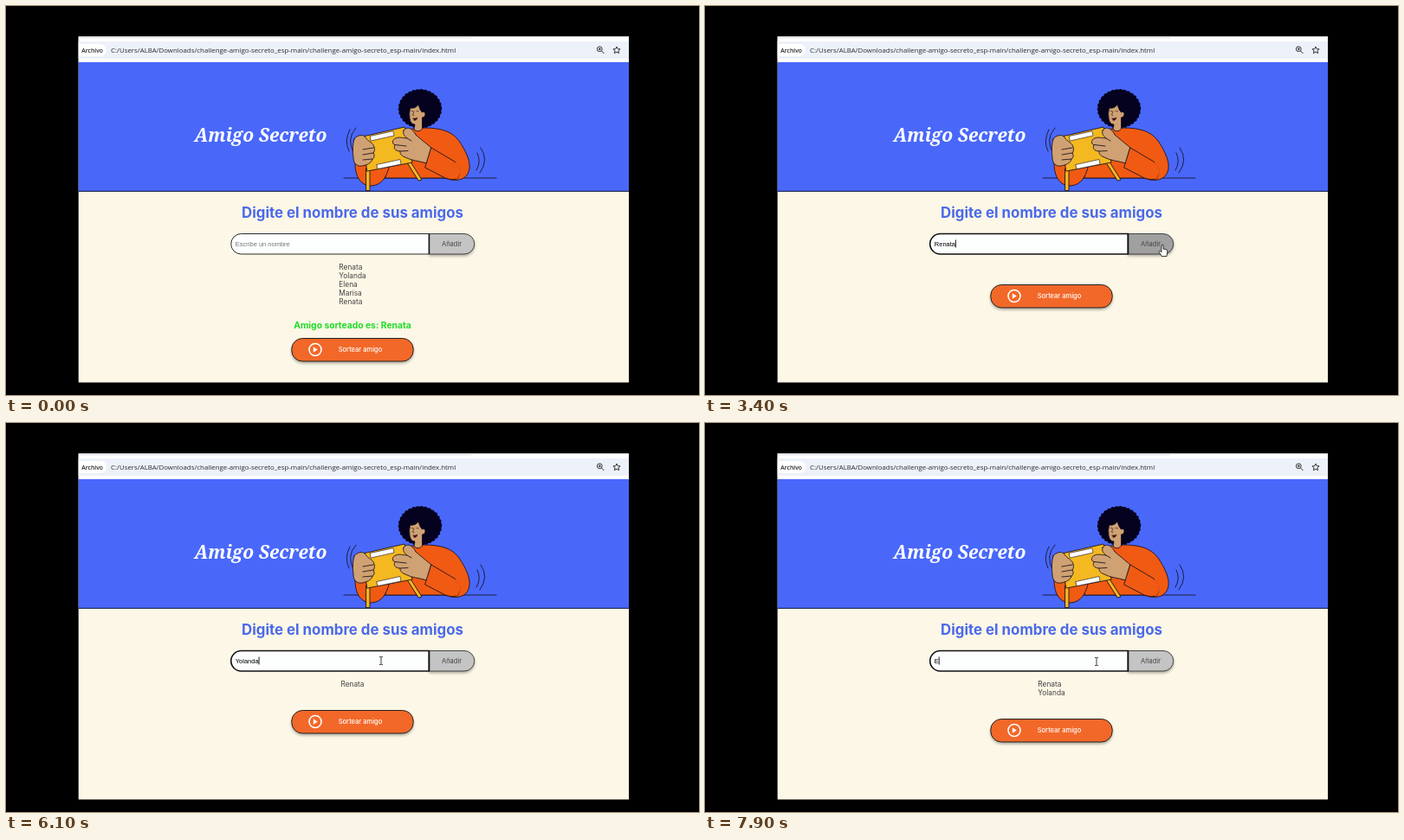
Write an HTML page that moves like this. It is 800 px wide and 450 px high and loops after 8000 ms.

```html
<!DOCTYPE html>
<html lang="es">
<head>
<meta charset="utf-8">
<title>Amigo Secreto</title>
<style>
  html, body { margin: 0; width: 100%; height: 100%; overflow: hidden; background: #000; }
  svg { position: absolute; left: 0; top: 0; }
  text { font-family: Inter, sans-serif; }
  .url { font-family: "Open Sans", sans-serif; }
  .field { font: 7.5px "Liberation Sans", Arial, sans-serif; }
  .mid { text-anchor: middle; }
  .drop { filter: drop-shadow(0 2px 1.5px rgba(0, 0, 0, .3)); }
  #names { position: absolute; left: 400px; top: 296.5px; transform: translateX(-50%);
    font: 8.3px/10px Inter, sans-serif; white-space: pre; color: #444; }
</style>
</head>
<body>
<svg width="800" height="450" viewBox="0 0 800 450">
  <rect x="83.7" y="35.4" width="635.3" height="400.1" fill="#fcf7e6"/>

  <!-- browser bar -->
  <rect x="83.7" y="35.4" width="635.3" height="30" fill="#fff"/>
  <rect x="84" y="36" width="453" height="1.5" fill="#e6eaf2"/>
  <rect x="83.7" y="41" width="635.3" height="20" fill="#edf1f9"/>
  <path d="M84 44H109a7 7 0 0 1 0 14H84z" fill="#fff"/>
  <text class="url" x="87.3" y="53.5" font-size="6.8" font-weight="600" fill="#222">Archivo</text>
  <text class="url" x="121" y="54" font-size="7.86" fill="#2a2c30">C:/Users/ALBA/Downloads/challenge-amigo-secreto_esp-main/challenge-amigo-secreto_esp-main/index.html</text>
  <g fill="none" stroke="#333" stroke-width="1">
    <circle cx="685.3" cy="49.8" r="2.9"/>
    <path d="M687.5 52L690.5 55M683.8 49.8h3M685.3 48.3v3"/>
    <path d="M705 47l1.2 2.7 2.9.2-2.2 1.9.7 2.9-2.6-1.6-2.6 1.6.7-2.9-2.2-1.9 2.9-.2z"/>
  </g>

  <!-- banner -->
  <rect x="83.7" y="65" width="635.3" height="149.5" fill="#4968fa"/>
  <path d="M83.7 214.3H719" stroke="#15183a"/>
  <text class="mid" x="294" y="156.8" font-size="21" fill="#fff"
    style="font-family:'Noto Serif',serif;font-weight:700;font-style:italic">Amigo Secreto</text>

  <!-- woman shaking a box -->
  <g stroke="#17101c" stroke-width=".85" stroke-linejoin="round" stroke-linecap="round">
    <path fill="none" d="M390 199H566M397 143Q390 156 396 168M404 141Q392 154 402 171M544 170Q549 180 543 190M548 164Q558 178 547 193"/>
    <path fill="#f15a13" d="M447 160C450 148 461 143 470 142L483 141C502 141 515 145 523 156C531 168 538 182 534 192C530 203 516 203 507 199H438z"/>
    <path fill="#f15a13" d="M403 182C403 198 410 208 422 208C434 207 439 198 442 187z"/>
    <ellipse cx="478" cy="118.8" rx="22.5" ry="20" fill="#05021f" stroke="#05021f" stroke-width="5.5" stroke-dasharray="0 4.4"/>
    <ellipse cx="478" cy="118.8" rx="23.5" ry="21" fill="#05021f" stroke="none"/>
    <path fill="#d0a172" d="M466.5 118Q473 119 476 114Q478 121 480.5 123Q484 121 484 126Q483 129 480.5 129V142Q477 147 471 143L472 137Q467 137 466 130Q465 124 466.5 118z"/>
    <path fill="none" stroke-width=".6" d="M468 121.5l2 .3M474 121.5l2.4.3M471 122l-1.6 4.2 1.6.3"/>
    <path fill="#4a1418" stroke-width=".4" d="M470 129.8Q473 130.2 475 129Q474.3 132.6 471.3 132.5z"/>
    <path fill="#f4b820" d="M416 188h4V213.5h-4zM462 179l3.5-1L480 201l-3.5 1z"/>
    <path fill="#f4b820" d="M412 151L460 140L469 181L417 191z"/>
    <path fill="#fff" stroke-width=".6" d="M420.5 150.5L447 144.8L448 150L421.5 156zM428 183.5L455 177.5L456 183L429.5 188.5z"/>
    <path fill="#d0a172" d="M402 154C405 149 413 148 415 152C418 157 424 158 425 163C426 167 425 169 424 170C426 173 425 176 423 177C422 182 416 184 411 185C405 186 401 182 401 175C400 168 400 160 402 154z"/>
    <path fill="none" d="M424 164l-12 2M424 170l-12 2M423 177l-11 1"/>
    <path fill="#d0a172" d="M459 144C463 138 470 142 473 149L491 164L486 182C476 179 468 179 461 175C455 173 455 170 455 168C449 168 447 164 449 161C445 159 446 154 450 153C453 151 460 153 463 153C459 150 458 147 459 144z"/>
    <path fill="none" d="M449 160.5l13 1.5M455 168l9-.5M463 153l5 3"/>
    <path fill="#f15a13" d="M491 164L518 180Q528 190 521 200Q514 202 507 199L484 187z"/>
    <path fill="none" stroke="#f15a13" stroke-width="2" d="M519 182Q527 191 520 199"/>
  </g>

  <!-- form -->
  <text class="mid" x="400" y="244.6" font-size="16.85" font-weight="700" fill="#4b69ea">Digite el nombre de sus amigos</text>
  <g class="drop">
    <path id="add" d="M488.5 263.5H529a11.75 11.75 0 0 1 0 23.5H488.5z" stroke="#333" stroke-width=".9"/>
  </g>
  <text class="mid" x="514.5" y="277.8" font-size="7.5" fill="#444">Añadir</text>
  <path id="box" d="M488.3 263.5H271.5a11.75 11.75 0 0 0 0 23.5H488.3z" fill="#fdfefe" stroke="#111"/>
  <path d="M488.5 263.5V287" stroke="#111" stroke-width="1.5"/>
  <text id="hint" class="field" x="264.8" y="277.7" fill="#757575">Escribe un nombre</text>
  <text id="typed" class="field" x="264.8" y="277.7" fill="#000"></text>
  <path id="spell" stroke="#555" stroke-width=".8" stroke-dasharray="1 1"/>
  <path id="caret" stroke="#000" stroke-width=".9"/>

  <text id="result" class="mid" x="400" y="372.7" font-size="10.3" font-weight="700" fill="#1fdc27">Amigo sorteado es: Renata</text>
  <g id="draw">
    <rect class="drop" x="329.8" y=".5" width="140.4" height="26.5" rx="12.5" fill="#f26829" stroke="#222"/>
    <circle cx="357" cy="13.5" r="7" fill="none" stroke="#fff" stroke-width="1.6"/>
    <path d="M354.8 10.3v6.4l5-3.2z" fill="#fff"/>
    <text class="mid" x="409" y="16.2" font-size="7.5" font-weight="500" fill="#fff">Sortear amigo</text>
  </g>
</svg>
<div id="names"></div>
<svg width="800" height="450" viewBox="0 0 800 450">
  <g id="pointer" fill="#fff" stroke="#111" stroke-width=".8" stroke-linejoin="round">
    <path id="arrow" d="M0 0V9.6L2.2 7.6L3.8 11.3L5.4 10.6L3.8 7H6.8z"/>
    <path id="beam" fill="none" d="M-2-4.5H-.6L0-4L.6-4.5H2M0-4V4M-2 4.5H-.6L0 4L.6 4.5H2"/>
    <path id="hand" d="M-1 .6Q0-.6 1 .6V5L5 6Q6 6.4 5.8 8L5 13.5H-.8L-3.8 8.6Q-4 7-2.6 7.4L-1 8.8z"/>
  </g>
</svg>

<script>
const LOOP = 8000;
const $ = id => document.getElementById(id);
const show = (id, on) => $(id).style.display = on ? '' : 'none';
const within = (t, spans) => spans.some(([a, b]) => t >= a && t < b);
const latest = (t, steps) => steps.filter(s => s[0] <= t).pop();

const CLEAR = 300, ADD1 = 3500, ADD2 = 7200;
const friends = ['Renata', 'Yolanda', 'Elena', 'Marisa', 'Renata'];
const counts = [[0, 5], [CLEAR, 0], [ADD1, 1], [ADD2, 2]];
const focusSpans = [[1400, ADD1], [4200, ADD2], [7550, LOOP]];
const caretOff = [[4600, 4900], [6500, 6900]];

// key times per word, and when the field is emptied
const words = [
  { word: friends[0], keys: [1600, 1900, 2100, 2300, 2400, 2800], end: ADD1 },
  { word: friends[1], keys: [4500, 4900, 5100, 5300, 5500, 5800, 6100], end: ADD2 },
  { word: friends[2], keys: [7800], end: LOOP }
];

// time, x, y
const path = [
  [700, 202, 186], [1000, 281, 251], [1300, 299, 274], [2700, 299, 274],
  [3400, 528, 276], [3700, 528, 276], [4300, 433, 275], [6600, 433, 275],
  [7000, 498, 282], [7200, 505, 279], [7500, 452, 276], [LOOP, 452, 276]
];

function pointerAt(t) {
  const i = path.findIndex(p => p[0] > t);
  const [a, b] = [path[i - 1], path[i]];
  const k = (t - a[0]) / (b[0] - a[0]);
  return [a[1] + (b[1] - a[1]) * k, a[2] + (b[2] - a[2]) * k];
}

function drawPointer(t) {
  const visible = t >= path[0][0];
  const [x, y] = visible ? pointerAt(t) : [0, 0];
  const inRow = y > 263 && y < 287;
  const overAdd = inRow && x > 488 && x < 540;
  show('pointer', visible);
  show('hand', overAdd);
  show('beam', inRow && !overAdd);
  show('arrow', !inRow);
  $('pointer').setAttribute('transform', `translate(${x} ${y})`);
  $('add').setAttribute('fill', overAdd ? '#a0a0a0' : '#c4c4c4');
}

function drawField(t) {
  const entry = words.find(w => t >= w.keys[0] && t < w.end);
  const text = entry ? entry.word.slice(0, entry.keys.filter(k => k <= t).length) : '';
  const focused = within(t, focusSpans);
  $('typed').textContent = text;
  const right = 264.8 + $('typed').getComputedTextLength();
  show('hint', !text);
  show('spell', t >= 6400 && t < ADD2);
  $('spell').setAttribute('d', `M265 279.8H${right}`);
  show('caret', focused && !within(t, caretOff));
  $('caret').setAttribute('d', `M${right + .4} 270.5V279.5`);
  $('box').setAttribute('stroke-width', focused ? 1.6 : .9);
}

function render(t) {
  const count = latest(t, counts)[1];
  const drawn = t < CLEAR;
  $('names').textContent = friends.slice(0, count).join('\n');
  show('result', drawn);
  $('draw').setAttribute('transform', `translate(0 ${322 + 10 * count + (drawn ? 12 : 0)})`);
  drawField(t);
  drawPointer(t);
}

const start = performance.now();
function tick() {
  render((performance.now() - start) % LOOP);
  requestAnimationFrame(tick);
}
tick();
</script>
</body>
</html>
```
